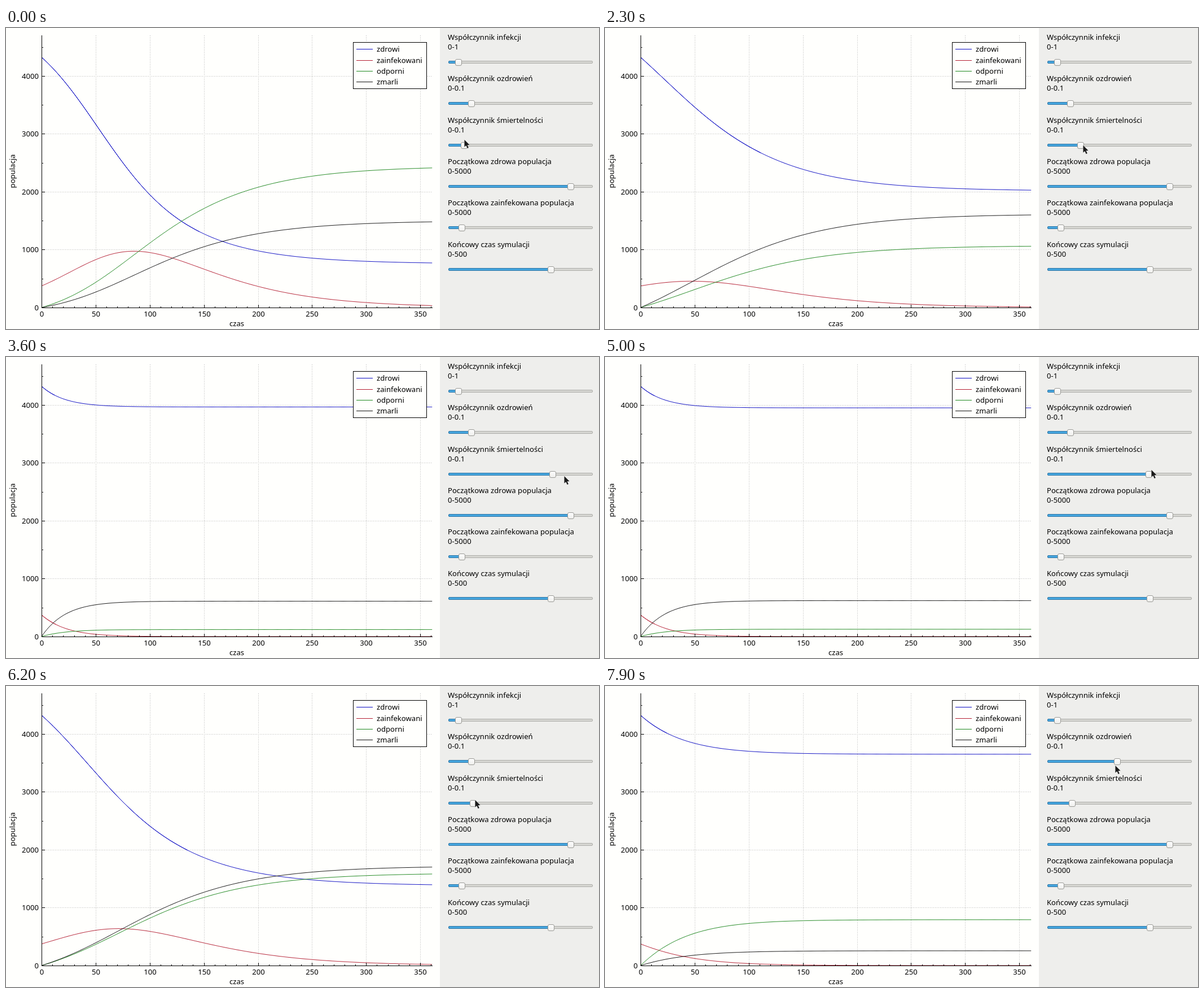
These frames come from a looping animation (1051 by 533 pixels, 8000 ms). An HTML page with a canvas:

```html
<!DOCTYPE html>
<html lang="pl">
<head>
<meta charset="utf-8">
<style>
html, body { margin: 0; width: 100%; height: 100%; overflow: hidden; background: #fffffd; }
canvas { display: block; }
</style>
</head>
<body>
<canvas id="stage" width="1051" height="533"></canvas>
<script>
const ctx = document.getElementById('stage').getContext('2d');
const LOOP = 8000, TICK = 100;
const X0 = 63, Y0 = 495, RIGHT = 756, TOP = 13, X_UNIT = 1.9175, Y_UNIT = 0.10255;
const HEALTHY = 4322, INFECTED = 373, TOTAL = HEALTHY + INFECTED, INFECTION = 0.0487, END = 361;
const PAPER = '#fffffd';

const SERIES = [
  ['zdrowi', '#0a0ac3'],
  ['zainfekowani', '#b41e32'],
  ['odporni', '#1e871e'],
  ['zmarli', '#111']
];

// [time, value, ...] keys, linear in between
const POINTER = [
  [0, 811, 197], [900, 812, 200], [1200, 814, 206], [1600, 814, 206], [2300, 846, 207],
  [3600, 988, 210], [4500, 1010, 204], [4700, 1010, 204], [5000, 967, 199], [5600, 850, 201],
  [6200, 830, 201], [6400, 830, 201], [6800, 820, 135], [6900, 820, 135], [7700, 904, 142],
  [7900, 903, 140]
];
const MORTALITY = [
  [0, 0.0089], [1600, 0.0089], [2300, 0.0219], [3600, 0.0732], [4500, 0.0889], [4700, 0.0889],
  [5000, 0.0712], [5600, 0.0238], [6200, 0.0156]
];
const RECOVERY = [[0, 0.0145], [6900, 0.0145], [7700, 0.0485]];

function at(track, t) {
  const next = track.findIndex(key => key[0] > t);
  if (next < 0) return track[track.length - 1].slice(1);
  const [t0, ...a] = track[next - 1], [t1, ...b] = track[next];
  return a.map((v, j) => v + (b[j] - v) * (t - t0) / (t1 - t0));
}

// Midpoint integration of the epidemic model, one row per time unit
function simulate(recovery, mortality) {
  const rates = ([s, i]) => {
    const caught = INFECTION * s * i / TOTAL;
    return [-caught, caught - (recovery + mortality) * i, recovery * i, mortality * i];
  };
  let state = [HEALTHY, INFECTED, 0, 0];
  const rows = [state];
  for (let t = 0; t < END; t++) {
    const slope = rates(state);
    const mid = rates(state.map((v, j) => v + slope[j] / 2));
    state = state.map((v, j) => v + mid[j]);
    rows.push(state);
  }
  return rows;
}

function path(color, points) {
  ctx.strokeStyle = color;
  ctx.beginPath();
  points.forEach(([x, y]) => ctx.lineTo(x, y));
  ctx.stroke();
}
const line = (color, x1, y1, x2, y2) => path(color, [[x1, y1], [x2, y2]]);

function text(str, x, y, align = 'left') {
  ctx.fillStyle = '#000';
  ctx.textAlign = align;
  ctx.fillText(str, x, y);
}

const px = t => Math.round(X0 + t * X_UNIT) + 0.5;
const py = v => Math.round(Y0 - v * Y_UNIT) + 0.5;

function drawGrid() {
  ctx.setLineDash([1, 2]);
  for (let t = 50; t <= 350; t += 50) line('#b4b4b4', px(t), TOP, px(t), Y0);
  for (let v = 1000; v <= 4000; v += 1000) line('#b4b4b4', X0, py(v), RIGHT, py(v));
  ctx.setLineDash([]);
}

function drawCurves(rows) {
  SERIES.forEach(([, color], j) => {
    const points = rows.map((row, t) => [X0 + t * X_UNIT, Y0 - row[j] * Y_UNIT]);
    path(color, points);
    // steeply falling stretches look heavier
    const steepEnd = points.findIndex(([, y], t) => t && y - points[t - 1][1] < X_UNIT / 2);
    if (steepEnd > 1) path(color, points.slice(0, steepEnd));
  });
}

function drawAxes() {
  line('#000', X0 + 0.5, TOP, X0 + 0.5, Y0 + 1);
  line('#000', X0, Y0 + 0.5, RIGHT, Y0 + 0.5);
  for (let t = 0; t <= 360; t += 10) {
    const major = t % 50 === 0;
    line('#000', px(t), Y0, px(t), Y0 - (major ? 5 : 2));
    if (major) text(t, px(t), 510.5, 'center');
  }
  for (let v = 0; v <= 4500; v += 500) {
    const major = v % 1000 === 0;
    line('#000', X0, py(v), X0 + (major ? 6 : 3), py(v));
    if (major) text(v, 58, py(v) + 4.5, 'right');
  }
  text('czas', 409, 528, 'center');
  ctx.save();
  ctx.translate(16, 253.5);
  ctx.rotate(-Math.PI / 2);
  text('populacja', 0, 0, 'center');
  ctx.restore();
}

function drawLegend() {
  ctx.fillStyle = PAPER;
  ctx.fillRect(615, 25, 131, 83);
  ctx.strokeStyle = '#000';
  ctx.strokeRect(615.5, 25.5, 130, 82);
  SERIES.forEach(([name, color], j) => {
    const y = Math.floor(37.9 + j * 19.2) + 0.5;
    line(color, 621, y, 650, y);
    text(name, 657, y + 4.5);
  });
}

function box(x, y, w, h, r, fill, stroke) {
  ctx.beginPath();
  ctx.roundRect(x, y, w, h, r);
  ctx.fillStyle = fill;
  ctx.fill();
  ctx.strokeStyle = stroke;
  ctx.stroke();
}

function drawPanel(recovery, mortality) {
  const sliders = [
    ['Współczynnik infekcji', INFECTION, 1],
    ['Współczynnik ozdrowień', recovery, 0.1],
    ['Współczynnik śmiertelności', mortality, 0.1],
    ['Początkowa zdrowa populacja', HEALTHY, 5000],
    ['Początkowa zainfekowana populacja', INFECTED, 5000],
    ['Końcowy czas symulacji', END, 500]
  ];
  ctx.fillStyle = '#eeeeec';
  ctx.fillRect(769, 0, 282, 533);
  sliders.forEach(([label, value, max], i) => {
    const y = Math.round(i * 73.3), mid = y + 61;
    const x = Math.round(790 + 244 * value / max);
    text(label, 783, y + 21);
    text('0-' + max, 783, y + 37.5);
    box(784.5, mid - 2.5, 255, 4, 1.5, '#d6d6d2', '#aeaeaa');
    box(784.5, mid - 2.5, x - 784.5, 4, 1.5, '#45a5de', '#2f76a6');
    const shine = ctx.createLinearGradient(0, mid - 6, 0, mid + 6);
    shine.addColorStop(0, '#fff');
    shine.addColorStop(1, '#ededeb');
    box(x - 5.5, mid - 5.5, 11, 11, 2.5, shine, '#9a9a96');
  });
}

function drawPointer([x, y]) {
  ctx.save();
  ctx.translate(Math.round(x) + 1.5, Math.round(y) + 1);
  ctx.beginPath();
  [[0, 0], [0, 12.6], [3, 10], [5.2, 15], [7.3, 14], [5, 9.2], [9, 8.9]].forEach(p => ctx.lineTo(...p));
  ctx.closePath();
  ctx.strokeStyle = '#e6e6e4';
  ctx.stroke();
  ctx.fillStyle = '#1a1a1a';
  ctx.fill();
  ctx.restore();
}

function draw(t) {
  const [recovery] = at(RECOVERY, t), [mortality] = at(MORTALITY, t);
  ctx.lineWidth = 1;
  ctx.font = '13.1px "Noto Sans", sans-serif';
  ctx.fillStyle = PAPER;
  ctx.fillRect(0, 0, 1051, 533);
  drawGrid();
  drawCurves(simulate(recovery, mortality));
  drawAxes();
  drawLegend();
  drawPanel(recovery, mortality);
  drawPointer(at(POINTER, t));
}

const start = performance.now();
function frame() {
  const t = Math.max(0, performance.now() - start) % LOOP;
  draw(Math.floor(t / TICK) * TICK);
  requestAnimationFrame(frame);
}
frame();
</script>
</body>
</html>
```
